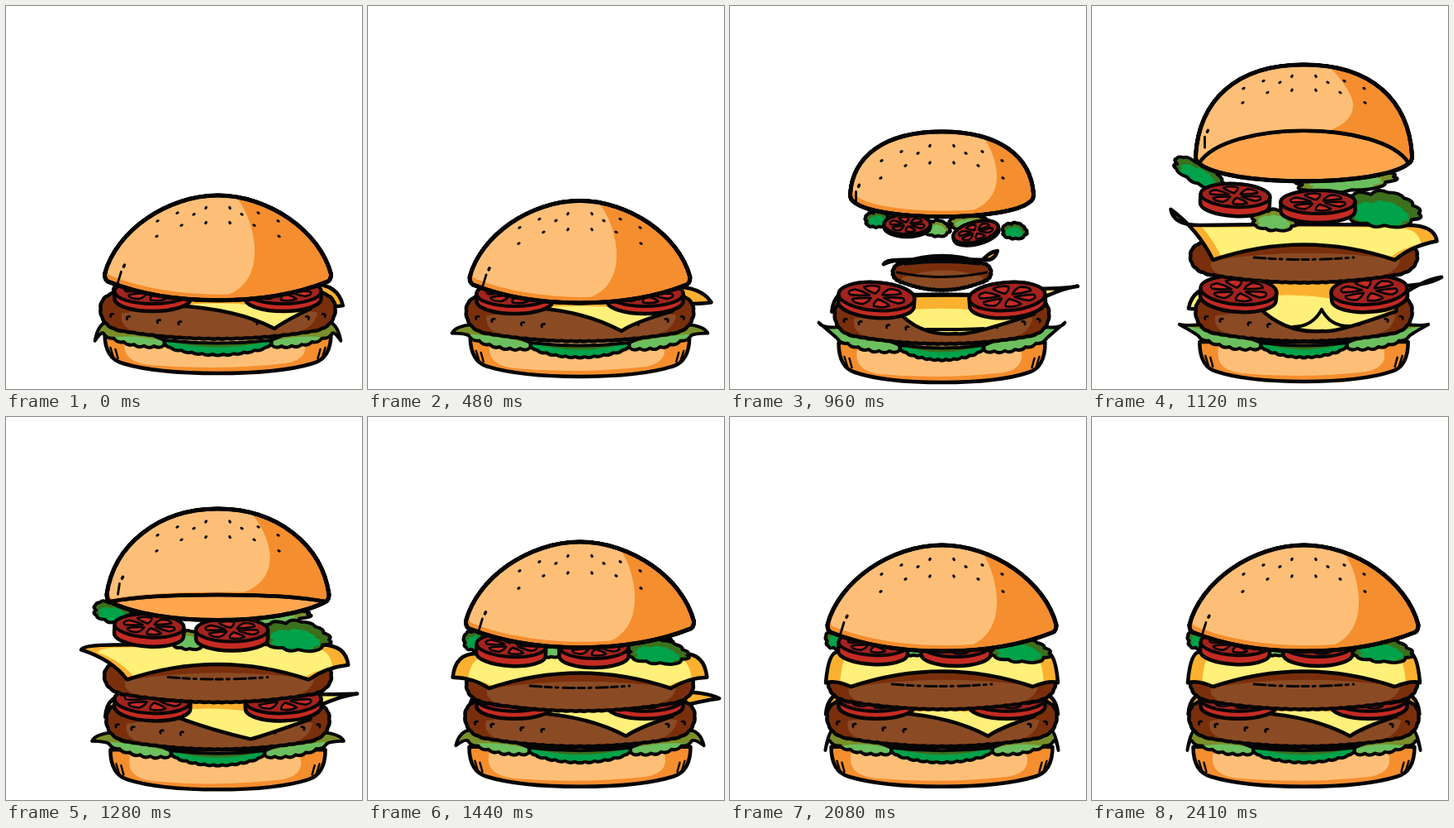
Write an HTML page with a canvas that moves like this. It is 431 px wide and 463 px high and loops after 2990 ms.

```html
<!DOCTYPE html>
<html lang="en">
<head>
<meta charset="utf-8">
<title>Burger</title>
<style>
html, body { margin: 0; height: 100%; overflow: hidden; background: #fff; }
canvas { display: block; }
</style>
</head>
<body>
<canvas id="stage" width="431" height="463"></canvas>
<script>
const ctx = document.getElementById('stage').getContext('2d');
const LOOP = 2990, STEP = 80, CX = 256.5;
const INK = '#050505';
const bunLight = '#fdbf77', bunDark = '#f58e2e', bunUnder = '#ffa64e';
const meat = '#8a4b24', meatDark = '#7a2f0c';
const leafLight = '#6cbf5f', olive = '#7a8f29', green = '#00a24a', leafDark = '#3c701c';
const cheeseLight = '#fff07a', cheeseDark = '#fbb12f';
const red = '#c42b23', redDark = '#a3221d';

// Poses: rest, crouch, burst, peak, landing, settling, settled
const TIMES = [0, 800, 960, 1120, 1440, 1760, 2160];
const out = u => 1 - (1 - u) ** 2;
const EASE = [u => u * u, u => u, u => u, u => u * u * (3 - 2 * u), out, out];
const TRACKS = {
  top: [229, 247, 152, 71, 151, 155],       // crown of the bun
  wide: [137, 127, 111, 131, 138, 138.5],   // its half width
  open: [0, 0, 0, 1, 0],                    // how far its underside shows
  puff: [0, 0, 1, 1, 0],                    // roundness while flying
  sink: [0, 1, 1, .9, .25],                 // base bun pressed down
  rise: [0, .4, .7, 1],                     // lower filling lifted
  swing: [1, -.65, -.2, 0, .8, 1.2],        // angle of soft tips
  flap: [.75, -.2, -.15, -.3, .1, .6, 1],   // angle of lower cheese corners
  grow: [0, 0, 0, 1],                       // size of the second layer
  deck: [343, 343, 343, 334, 355, 353]      // bottom of the second patty
};

function poseAt(t) {
  let i = 0;
  while (i < TIMES.length - 2 && t >= TIMES[i + 1]) i++;
  const u = EASE[i](Math.min(1, (t - TIMES[i]) / (TIMES[i + 1] - TIMES[i])));
  const pose = {};
  for (const [name, keys] of Object.entries(TRACKS)) {
    const key = k => keys[Math.min(k, keys.length - 1)];
    pose[name] = key(i) + (key(i + 1) - key(i)) * u;
  }
  return pose;
}

// Quadratic outline; bumps[edge] = [count, height] makes that edge scalloped.
function quad(p, bumps = {}) {
  const s = new Path2D();
  let [x, y] = p;
  s.moveTo(x, y);
  for (let i = 2, e = 0; i < p.length; i += 4, e++) {
    const [cx, cy, ex, ey] = p.slice(i, i + 4);
    const [n, h] = bumps[e] || [0, 0];
    if (!n) s.quadraticCurveTo(cx, cy, ex, ey);
    for (let k = 1, px = x, py = y; k <= n; k++) {
      const u = k / n, v = 1 - u;
      const qx = v * v * x + 2 * u * v * cx + u * u * ex;
      const qy = v * v * y + 2 * u * v * cy + u * u * ey;
      const dx = qx - px, dy = qy - py, d = 2 * h / (Math.hypot(dx, dy) || 1);
      s.quadraticCurveTo((px + qx) / 2 + dy * d, (py + qy) / 2 - dx * d, qx, qy);
      px = qx; py = qy;
    }
    x = ex; y = ey;
  }
  s.closePath();
  return s;
}

function paint(path, fill, inner, tone, width = 4.5) {
  ctx.fillStyle = fill;
  ctx.fill(path);
  if (inner) {
    ctx.save();
    ctx.clip(path);
    ctx.fillStyle = tone;
    ctx.fill(inner);
    ctx.restore();
  }
  ctx.lineWidth = width;
  ctx.stroke(path);
}

function curve(x0, y0, cx, cy, x1, y1, width = 2.5) {
  ctx.lineWidth = width;
  ctx.beginPath();
  ctx.moveTo(x0, y0);
  ctx.quadraticCurveTo(cx, cy, x1, y1);
  ctx.stroke();
}
const line = (x0, y0, x1, y1, width) => curve(x0, y0, x0, y0, x1, y1, width);

// Draws the left half, then its mirror image.
function bothSides(draw) {
  for (const side of [-1, 1]) {
    ctx.save();
    if (side > 0) {
      ctx.translate(2 * CX, 0);
      ctx.scale(-1, 1);
    }
    draw(side);
    ctx.restore();
  }
}

function drawBase(w, bot) {
  const x = k => CX + k * w, top = bot - 48;
  paint(
    quad([x(-1), top, x(-1), bot - 18, x(-.84), bot - 12, x(-.55), bot, CX, bot,
      x(.55), bot, x(.84), bot - 12, x(1), bot - 18, x(1), top]),
    bunDark,
    quad([x(-.8), top, x(-.9), bot - 15, x(-.6), bot - 10, CX, bot - 3, x(.6), bot - 12,
      x(.85), bot - 18, x(.74), top]),
    bunLight);
  bothSides(() => {
    for (let i = 0; i < 2; i++) line(x(-1) + 7 + i * 6, bot - 31 + i * 2, x(-1) + 11 + i * 5, bot - 18);
  });
}

function drawLeaves(w, y, p) {
  const rx = CX - w * .98, ry = y - 20, ax = rx - 4, ay = ry + 14;
  const tx = rx - 27 * Math.cos(p.swing), ty = ry + 27 * Math.sin(p.swing);
  const ix = CX - 65 + 14 * p.sink, iy = y + 2, ex = 2 * CX - ix;
  const side = quad([tx, ty, tx + 4, ry + 2, rx, ry, (rx + ix) / 2, ry + 6, ix, iy, ix, iy, ix, iy + 6,
    (ix + ax) / 2, y + 13, ax, ay, ax - 3, ay - 3, tx, ty], { 3: [6, 2.2] });
  const shade = quad([tx, ty, tx + 4, ry - 2, rx, ry, rx, ry - 2, ix, iy - 6, ix, iy, ix, iy + 1,
    rx + 25, ry + 12, tx, ty]);
  bothSides(() => paint(side, leafLight, shade, olive, 4));
  paint(
    quad([ix, iy, CX, iy + 7, ex, iy, ex, iy + 8, ex - 8, y + 11,
      CX, y + 27, ix + 8, y + 11, ix, iy + 8, ix, iy], { 2: [9, 1.6] }),
    green, quad([ix, iy, CX, iy + 17, ex, iy, CX, iy - 5, ix, iy]), leafDark, 4);
}

function drawPatty(w, bot, depth) {
  const x = k => CX + k * w, top = bot - depth, mid = bot - depth * .64;
  const rough = [4, 1.2];
  paint(
    quad([x(-1), mid, x(-1), top, x(-.75), top, CX, top - 5, x(.75), top, x(1), top, x(1), mid,
      x(1), bot - 13, x(.8), bot - 9, CX, bot + 9, x(-.8), bot - 9, x(-1), bot - 13, x(-1), mid],
      { 0: rough, 2: rough, 3: rough, 4: [20, .7], 5: rough }),
    meatDark,
    quad([x(-.82), mid + 6, CX, mid - 12, x(.85), mid + 5, x(.82), bot - 9, x(.6), bot - 6,
      CX, bot + 2, x(-.6), bot - 6, x(-.85), bot - 9, x(-.82), mid + 6]),
    meat);
}

function drawSpots(w, bot) {
  bothSides(() => {
    for (const k of [.9, .76, .5, .32]) {
      ctx.lineWidth = 2.8;
      ctx.beginPath();
      ctx.arc(CX - k * w, bot - 17 - 13 * k * k, 2.3, 2.6, 5.2);
      ctx.stroke();
    }
  });
}

// One line across the small patty breaks into dashes as it grows.
function drawGrill(w, p) {
  const y = p.deck - 18 - 9 * p.grow, reach = w * (.92 - .48 * p.grow), gap = 4 * p.grow;
  ctx.setLineDash([14, gap, 8, gap + 1, 3, gap + 2]);
  curve(CX - reach, y - 3, CX, y + 8 - 6 * p.grow, CX + reach, y - 3, 3);
  ctx.setLineDash([]);
}

function drawFlaps(w, y, p, t) {
  const fill = t > 480 && t < 1400 ? cheeseLight : cheeseDark;
  bothSides(side => {
    const a = p.flap + (side < 0 && t < 1680 ? 1.1 : 0), len = 46 - 18 * a;
    const x = CX - w * .9, tx = x - len * Math.cos(a), ty = y - 62 + len * Math.sin(a);
    paint(quad([x + 14, y - 66, (x + tx) / 2 - 6, y - 66, tx, ty,
      (x + tx) / 2, ty + 3, x + 12, y - 46]), fill);
  });
}

function drawLowCheese(y, p) {
  const lx = CX - 54, rx = CX + 112, top = y - 57 - 14 * p.open;
  const tx = 325 - 50 * p.sink, ty = y - 12;
  paint(
    quad([lx, y - 40, tx - 45, ty - 24 + 28 * p.puff, tx, ty, tx + 14, ty - 10 + 13 * p.puff, rx, y - 36,
      rx, top, rx, top, CX, top - 3, lx, top, lx, top, lx, y - 40]),
    cheeseLight,
    quad([lx, top - 6, CX, top - 6, rx, top - 6, rx, y - 30, rx, y - 30, CX + 20, top + 8, lx, top + 18]),
    cheeseDark);
  if (p.puff > .5) {
    const peak = ty - 5 - 21 * p.open;
    curve(tx - 37, ty - 5, tx - 13, ty - 5, tx - 2, peak, 4);
    curve(tx - 2, peak, tx + 9, ty - 5, tx + 32, ty - 6, 4);
  }
}

function drawHighCheese(size, p) {
  const twist = p.puff * (p.grow - .5), len = 40 * size;
  const y = p.deck - 36 - 33 * p.grow, low = p.deck - 33 + 6 * p.grow, bend = 37 * size;
  const corner = side => {
    const a = p.swing + side * twist;
    return [CX + side * (126 * size + len * Math.cos(a)), y + len * Math.sin(a)];
  };
  const [lx, ly] = corner(-1), [rx, ry] = corner(1);
  const x = k => CX + k * size;
  const sheet = [lx, ly, lx + 3, y, x(-126), y, CX, y - 2, x(126), y, rx - 3, y, rx, ry,
    x(131), (ry + low) / 2 - 6, x(110), low, CX, low - bend, x(-110), low,
    x(-128), (ly + low) / 2 - 6, lx, ly];
  const inner = sheet.map((v, i) => i % 2 ? v + 3 : CX + (v - CX) * .88);
  paint(quad(sheet), cheeseDark, quad(inner), cheeseLight);
}

function drawTomato(x, y, rx, ry, thick, tilt) {
  const body = new Path2D(), face = new Path2D();
  body.ellipse(0, 0, rx, ry, 0, Math.PI, 2 * Math.PI);
  body.ellipse(0, thick, rx, ry, 0, 0, Math.PI);
  body.closePath();
  face.ellipse(0, 0, rx, ry, 0, 0, 7);
  const spot = (a, r) => [rx * r * Math.cos(a), ry * r * Math.sin(a)];
  ctx.save();
  ctx.translate(x, y);
  ctx.rotate(tilt);
  paint(body, red);
  paint(face, redDark, null, null, 4);
  for (let i = 0; i < 6; i++) {
    const a = i * Math.PI / 3 + .3;
    paint(quad([...spot(a, .2), ...spot(a - .4, .5), ...spot(a - .3, .7),
      ...spot(a, .85), ...spot(a + .3, .7), ...spot(a + .4, .5), ...spot(a, .2)]),
      red, null, null, 2.6);
  }
  ctx.restore();
}

// Ruffled leaf with uneven scallops
function drawSalad(x, y, rx, ry, tilt, rim, tone) {
  const n = 13;
  const ruffle = (k, dy) => {
    const s = new Path2D();
    for (let i = 0; i <= n; i++) {
      const a = i * 2 * Math.PI / n, b = a - Math.PI / n;
      const r = k * (.95 + .09 * Math.sin((i % n) * 4)), c = k * (1.16 + .1 * Math.cos(i * 5));
      const px = rx * r * Math.cos(a), py = ry * r * Math.sin(a) + dy;
      if (i) s.quadraticCurveTo(rx * c * Math.cos(b), ry * c * Math.sin(b) + dy, px, py);
      else s.moveTo(px, py);
    }
    s.closePath();
    return s;
  };
  ctx.save();
  ctx.translate(x, y);
  ctx.rotate(tilt);
  paint(ruffle(.95, 0), rim, ruffle(.68, ry * .25), tone, 4);
  ctx.restore();
}

function drawSecondLayer(p) {
  const g = p.grow, size = .43 + .57 * g, w = 137 * size;
  drawPatty(w, p.deck, 18 + 32 * size);
  drawGrill(w, p);
  drawHighCheese(size, p);

  const y = p.deck - 77 - 26 * p.open, o = p.open;
  drawSalad(CX + 34 + 16 * g, y - 4 - 17 * o, 27 + 38 * g, 9 + 6 * o, -.06 * g, olive, leafLight);
  drawSalad(CX + 88 + 6 * g, y + 6 + 9 * o, 16 + 24 * g + 10 * o, 10 + 5 * g + 7 * o, .1, leafDark, green);
  drawSalad(CX - 78 - 48 * g, y - 8 - 20 * o, 16 + 21 * o, 10 + 3 * g, .5 * o, leafDark, green);
  drawSalad(CX - 6 - 30 * g, y + 3 + 25 * o, 17 + 12 * o, 10 + 3 * o, .1, olive, leafLight);

  const r = 28 + 14 * g, ry = 12 + 2 * g, thick = 3 + 8 * g;
  drawTomato(CX - 42 - 41 * g, y - 2, r, ry, thick, .05 * g);
  drawTomato(CX + 41 - 24 * g, y + 7 - 7 * g + 6 * o, r + 3 * o, ry, thick, -.25 * (1 - g));
}

function drawTop(p) {
  const { top, wide: w, open, puff } = p;
  const foot = top + w * (.76 + .15 * open), side = foot - 9, h = side - top;
  const low = foot + .165 * w, rim = low - 61 * open;
  const l = CX - w, r = CX + w;
  const c1 = (.9 + .07 * puff) * w, c2 = (.445 + .18 * puff) * w, rise = (.55 + .06 * puff) * h;
  const belly = (.42 + .3 * puff) * w;
  const dome = edge => {
    const s = new Path2D(), e = edge + (edge - foot) / 3;
    s.moveTo(l, side);
    s.bezierCurveTo(CX - c1, side - rise, CX - c2, top, CX, top);
    s.bezierCurveTo(CX + c2, top, CX + c1, side - rise, r, side);
    s.quadraticCurveTo(r, foot - 2, r - 4, foot);
    s.bezierCurveTo(CX + belly, e, CX - belly, e, l + 4, foot);
    s.quadraticCurveTo(l, foot - 2, l, side);
    s.closePath();
    return s;
  };
  const whole = dome(low), face = dome(rim), inset = 7 * (1 - open);
  const lit = 298 + 22 * Math.max(puff, p.grow) - 7 * open;

  paint(whole, bunUnder, null, null, 5);
  paint(face, bunDark);
  ctx.save();
  ctx.clip(face);
  ctx.translate(3, -inset);
  ctx.clip(face);
  ctx.fillStyle = bunLight;
  ctx.fill(quad([lit - 34, top - 4, lit - 4, top + .25 * h, lit, (top + rim) / 2 + 6,
    lit + 2, rim - 6, lit - 44, rim + 4, l, low, l - 9, low, l - 9, top, l - 9, top - 4]));
  ctx.restore();
  ctx.lineWidth = 4.5;
  ctx.stroke(face);
  ctx.lineWidth = 5;
  ctx.stroke(whole);

  // Seeds in three bowed rows
  const spread = 1 - .18 * open - .12 * (1 - Math.max(p.grow, p.rise / .4 > 1 ? 1 : p.rise / .4));
  ctx.fillStyle = INK;
  bothSides(() => {
    for (const [dx, dy] of [[14.5, 17], [29, 26], [49, 24], [73, 35], [14.5, 37.5], [44, 41], [74, 56]]) {
      ctx.beginPath();
      ctx.ellipse(CX - dx, top + dy * spread, 2.3, 1.6, dx < 20 ? 2.2 : -.5, 0, 7);
      ctx.fill();
    }
  });
  const mx = l + 24 - 13 * puff + 4 * open, my = side - 20 * open;
  line(mx, my - 11, mx - 1, my - 9, 3.5);
  line(mx - 4, my - 3, mx - 8 + 4 * puff, my + 10, 2.8);
}

function draw(t) {
  const p = poseAt(t);
  ctx.fillStyle = '#fff';
  ctx.fillRect(0, 0, 431, 463);
  ctx.strokeStyle = INK;
  ctx.lineJoin = ctx.lineCap = 'round';

  const baseW = 137 - 12 * p.sink, baseY = 444 + 11 * p.sink;
  const w = baseW * 1.035, y = baseY - 42 - 7 * p.rise;
  drawBase(baseW, baseY);
  drawLeaves(baseW, y, p);
  drawFlaps(w, y, p, t);
  drawPatty(w, y, 57);
  drawSpots(w, y);
  drawLowCheese(y, p);
  for (const side of [-1, 1])
    drawTomato(CX + side * 79, y - 57 - 4 * p.open, 46, 15 + 2 * p.puff, 9, -.07 * side * p.puff);
  if (t > 800) drawSecondLayer(p);
  drawTop(p);
}

const start = performance.now();
function tick() {
  const t = (performance.now() - start) % LOOP;
  draw(Math.floor(t / STEP) * STEP);
  requestAnimationFrame(tick);
}
tick();
</script>
</body>
</html>
```
